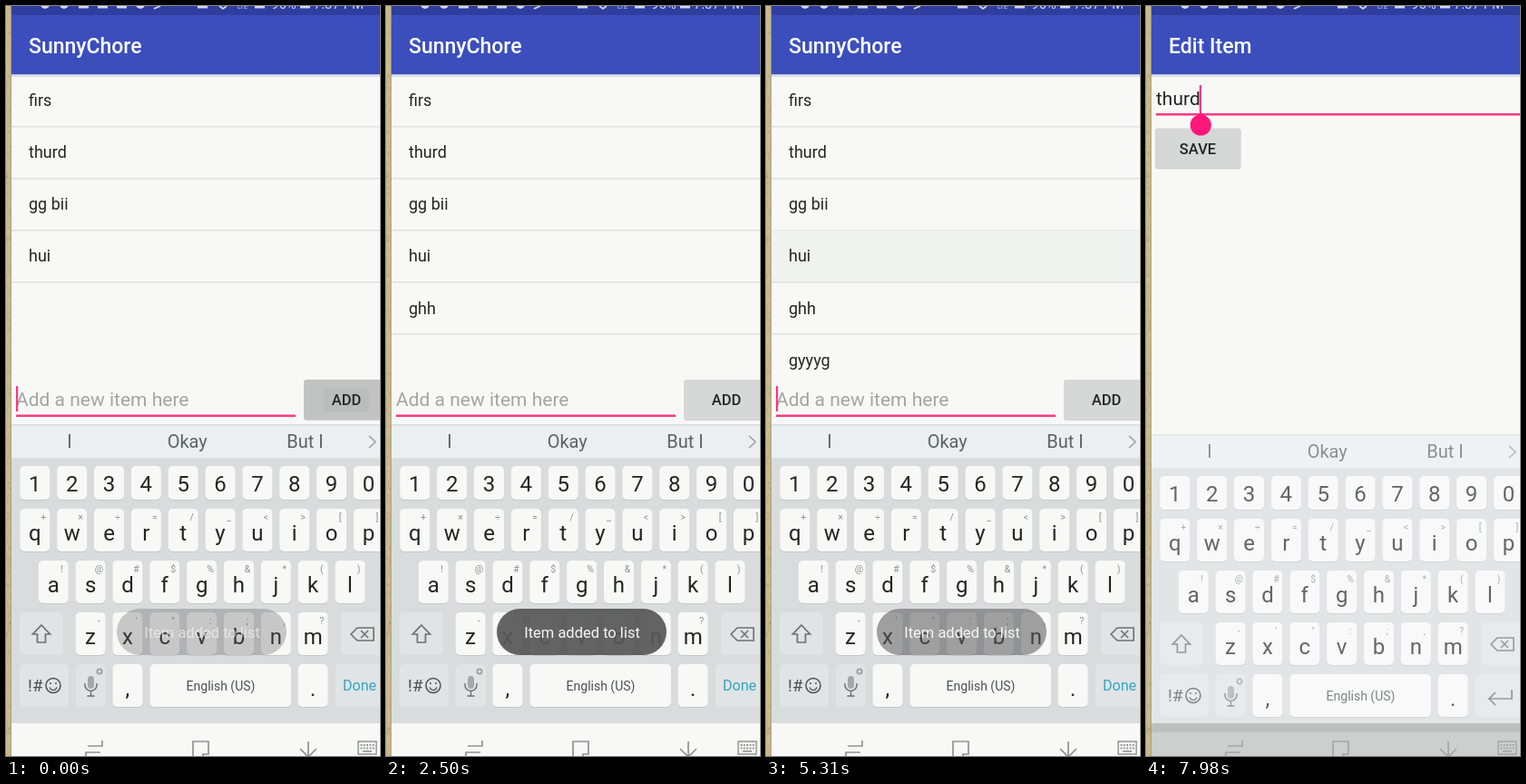
Write an HTML page with a canvas that moves like this. It is 412 by 825 pixels and loops after 8 s.

```html
<!DOCTYPE html>
<html lang="en">
<head>
<meta charset="utf-8">
<title>To-do list</title>
<style>
html, body { margin: 0; width: 100%; height: 100%; overflow: hidden; background: #f8f9f7; }
canvas { display: block; width: 412px; height: 825px; }
</style>
</head>
<body>
<canvas id="stage" width="412" height="825"></canvas>
<script>
const c = document.getElementById('stage').getContext('2d');
const LOOP = 8000, STEP = 147.7;
const PAPER = '#f8f9f7', PINK = '#fa3a82', INK = '#242625', GREY = '#6b7073', DIM = '#4b5053';
const LEFT = 6, WIDTH = 406, BAR = 75, ROW = 57.2, PITCH = 40.85, KEY = 33, TALL = 47;

const clamp = v => Math.max(0, Math.min(1, v));

function rect(x, y, w, h, color, r = 0) {
  c.fillStyle = color;
  c.beginPath();
  c.roundRect(x, y, w, h, r);
  c.fill();
}

const band = (y, h, color) => rect(LEFT, y, WIDTH, h, color);

function text(s, x, y, size, color = INK, align = 'left', weight = 400) {
  c.font = `${weight} ${size}px Roboto, sans-serif`;
  c.textAlign = align;
  c.fillStyle = color;
  c.fillText(s, x, y);
  return c.measureText(s).width;
}

function line(d, color, width = 1.7) {
  c.strokeStyle = color;
  c.lineWidth = width;
  c.stroke(new Path2D(d));
}

function disc(x, y, r, color) {
  c.fillStyle = color;
  c.beginPath();
  c.arc(x, y, r, 0, Math.PI * 2);
  c.fill();
}

function ring(x, y, r, color, width = 1.5, from = 0, to = Math.PI * 2) {
  c.strokeStyle = color;
  c.lineWidth = width;
  c.beginPath();
  c.arc(x, y, r, from, to);
  c.stroke();
}

function group(x, y, alpha, draw) {
  c.save();
  c.translate(x, y);
  c.globalAlpha = alpha;
  draw();
  c.restore();
}

function within(x, y, w, h, draw) {
  c.save();
  c.beginPath();
  c.rect(x, y, w, h);
  c.clip();
  draw();
  c.restore();
}

// Toast strength: quick rise from step a, slower fall ending at step b
const pulse = (k, a, b) => clamp((k - a + 1) / 3) * clamp((b - k) / 4);

const typing = (word, k, from, to) => k < to ? word.slice(0, Math.max(0, k - from)) : '';

function state(k) {
  const items = ['firs', 'thurd', 'gg bii'];
  if (k < 40) items.push('hui');
  if (k >= 8) items.push('ghh');
  if (k >= 29) items.push('gyyyg');
  return {
    items,
    typed: k < 8 ? typing('ghh', k, 2, 8) : typing('gyyyg', k, 19, 29),
    words: k > 5 && k < 9 ? ['ghh', 'ugh', 'high']
      : k > 23 && k < 31 ? ['gyyyg', 'tough', 'though'] : ['I', 'Okay', 'But I'],
    held: k === 35 || k === 36 ? 'hui' : k >= 45 ? 'thurd' : '',
    pressed: k < 2 || k === 7 || k === 8 || k === 29 || k === 30,
    cursor: k !== 17 && (k < 37 || k % 4 < 2),
    toast: Math.max(pulse(k, 0, 5.2), pulse(k, 8, 24), pulse(k, 29, 38.4)),
    slide: k < 49 ? 381 * .3 ** (k - 46) : 0,
    board: k < 53 ? Math.max(0, 150 * (k - 48)) : 11 + 109 * (54 - k)
  };
}

function wall() {
  rect(0, 0, LEFT, 825, '#c8ba8d');
  let seed = 7;
  const rnd = () => (seed = seed * 16807 % 2147483647) / 2147483647;
  for (let i = 0; i < 400; i++)
    rect(rnd() * 5, rnd() * 825, 1 + rnd(), 1 + rnd() * 2, i % 2 ? 'rgba(110,92,50,.12)' : 'rgba(245,232,190,.16)');
  rect(5, 0, 1, 825, '#a89d7c');
}

function statusBar() {
  const pale = '#d5d9ef';
  band(0, 10, '#2f3e9e');
  for (let i = 0; i < 6; i++) {
    const x = 43 + i * 21;
    i % 5 < 2 ? disc(x, -2, 5, pale) : rect(x - 5, 0, 11, 2.5, pale);
  }
  line('M163 3l7-3M235 0l4 3 4-3', pale);
  for (const x of [211, 274, 324]) rect(x, 0, 11, 2.5, pale);
  text('LTE', 255, 3, 7, pale);
  text('96%', 292, 3, 15, pale);
  text('7:37 PM', 339, 3, 15, pale);
}

function appBar(title) {
  band(10, BAR - 10, '#3b4ebc');
  const shade = c.createLinearGradient(0, BAR, 0, BAR + 4);
  shade.addColorStop(0, '#bcc2de');
  shade.addColorStop(1, PAPER);
  band(BAR, 4, shade);
  text(title, 25, 52, 23, '#fff', 'left', 500);
}

function button(label, x, y, w, mid, pressed) {
  rect(x, y + 1, w, 44, '#cfd1d0', 3);
  rect(x, y, w, 44, pressed ? '#c1c3c2' : '#d6d8d7', 3);
  if (pressed) rect(mid - 25, y + 9, 50, 26, '#bbbdbc');
  text(label, mid, y + 28, 16.5, INK, 'center', 500);
}

function listScreen(s, k) {
  band(10, 779, PAPER);
  s.items.forEach((item, i) => {
    const y = BAR + i * ROW;
    if (item === s.held) band(y, ROW, k < 40 ? '#f0f2ef' : '#e6e8e7');
    text(item, 25, Math.round(y + 34.8), 18);
    if (i < 5) band(Math.round(y + ROW - .6), 1.6, '#dfe2e0');
  });
  appBar('SunnyChore');
  band(411, 50, PAPER);
  let end = 11;
  if (s.typed) {
    end += text(s.typed, 11, 440, 21);
    rect(11, 442, end - 11, 1.3, INK);
  } else text('Add a new item here', 11, 440, 21, '#a3a5a4');
  rect(11, 449.5, 308, 2.5, PINK);
  if (s.cursor) rect(end, 418, 2.2, 28, PINK);
  button('ADD', 328, 411, 90, 375, s.pressed);
}

function editScreen(k) {
  band(10, 815, PAPER);
  appBar('Edit Item');
  const end = 11 + text('thurd', 11, 109, 21);
  rect(11, 118, 401, 2.4, PINK);
  button('SAVE', 10, 134.5, 94.5, 57, false);
  if (k >= 52) {
    rect(end - 1, 87, 2.2, 31, PINK);
    disc(end + .5, 131, 11.6, '#ff1779');
    c.fill(new Path2D(`M${end + .5} 117l9 8h-18z`));
  } else if (k < 48 || k % 4 < 2) rect(11, 88, 2.2, 28, PINK);
}

function key(x, y, w, h = TALL) {
  rect(x, y + 1, w, h, '#c3c8c9', 5);
  rect(x, y, w, h, PAPER, 5);
}

const softKey = (x, y, w) => rect(x, y, w, TALL, '#e0e4e5', 5);

// A row of letter keys; start is the centre of the first, in key pitches
function keyRow(keys, hints, start, y, h = TALL) {
  [...keys].forEach((letter, i) => {
    const mid = 31.8 + (start + i) * PITCH;
    key(mid - KEY / 2, y, KEY, h);
    text(letter, mid, y + h / 2 + 9 + (h > 40 ? 2.5 : 0), 24, INK, 'center');
    if (hints) text(hints[i], mid + 9.5, y + 13, 10.5, '#8b9092', 'center');
  });
}

function keyboard(words, enter) {
  band(460, 38, '#ebeff1');
  band(460, 1.5, '#d9dddd');
  words.forEach((w, i) => text(w, 70 + i * 129.7, 486, 20, '#5c6265', 'center'));
  line('M400 473l7 6.5-7 6.5', '#9ea4a6');
  band(497.5, 291.5, '#d8dcdd');

  keyRow('1234567890', '', 0, 506, 37);
  keyRow('qwertyuiop', '+×÷=/_<>[]', 0, 553);
  keyRow('asdfghjkl', '!@#$%&*()', .5, 610);
  keyRow('zxcvbnm', '-\'":;,?', 1.5, 667);
  keyRow(',', '', 2.5, 724);
  keyRow('.', '', 7.5, 724);
  key(158.5, 724, 155.5);
  text('English (US)', 236.5, 753, 14, DIM, 'center');

  softKey(15, 667, 48);
  softKey(369, 667, 50);
  softKey(15, 724, 54);
  softKey(77, 724, KEY);
  softKey(363, 724, 56);
  line('M39 681l9.5 10h-5v9h-9v-9h-5z', GREY);
  line('M380 691l7-7h18v14h-18zM391 687l8 8m0-8l-8 8', GREY, 1.6);

  text('!#', 24, 754, 19, DIM);
  ring(52, 747.5, 8, DIM);
  ring(52, 748.5, 4, DIM, 1.3, .2, 2.9);
  disc(49, 745, 1, DIM);
  disc(55, 745, 1, DIM);

  rect(90, 737, 7, 14, '#a3a9ab', 3.5);
  line('M87 745v2a6.5 6.5 0 0 0 13 0v-2M93.5 754v5m-4 0h8', GREY, 1.4);
  ring(103, 732, 2.6, '#9a9fa1', 1.8);

  if (enter) line('M403 741v10h-25l7-7m-7 7l7 7', GREY);
  else text('Done', 389.5, 753, 16, '#35a3c1', 'center');
}

function navBar(color, ink, typing) {
  band(789, 36, color);
  line('M90 814h16v-6M104 821h-16v6', ink);
  line('M206 826v-17h17v14h-6v3', ink);
  if (!typing) return line('M342 817.5h-17m7.5-7.5l-7.5 7.5 7.5 7.5', ink);
  line('M333 809v17m-9-9l9 9 9-9', ink);
  line('M388 809h20v14h-20z', ink, 1.4);
  for (let i = 0; i < 10; i++)
    rect(390.5 + i % 5 * 3.3, i < 5 ? 812 : 815.5, 1.9, 1.9, ink);
  rect(393, 819, 10, 1.6, ink);
}

function toast(alpha) {
  group(0, 0, alpha, () => rect(122, 663, 187, 51, 'rgba(88,88,88,.93)', 25.5));
  group(0, 0, clamp(alpha * 2), () => text('Item added to list', 216, 695, 16.5, '#f6f6f6', 'center'));
}

function draw(k) {
  const s = state(k), rising = k >= 53;
  rect(0, 0, 412, 825, PAPER);
  if (k < 49) listScreen(s, k);
  if (k >= 46) {
    // The sliding screen starts at its own left edge; only the title shows over the bar
    within(LEFT + s.slide, 10, WIDTH, 815, () => group(s.slide, 0, 1, () => editScreen(k)));
  }
  within(LEFT, 440, WIDTH, 349, () => group(0, s.board, 1, () => {
    keyboard(s.words, k > 50);
    if (rising) band(460, 330, 'rgba(248,249,247,.3)');
  }));
  if (rising) {
    navBar('#cbcfce', '#a3a8a6', true);
    band(789, 10, '#bcc1bf');
  } else navBar(PAPER, '#8e9391', k < 46);
  toast(s.toast);
  statusBar();
  wall();
}

function tick(now) {
  draw(Math.min(54, Math.floor(now % LOOP / STEP + .1)));
  requestAnimationFrame(tick);
}
requestAnimationFrame(tick);
</script>
</body>
</html>
```
